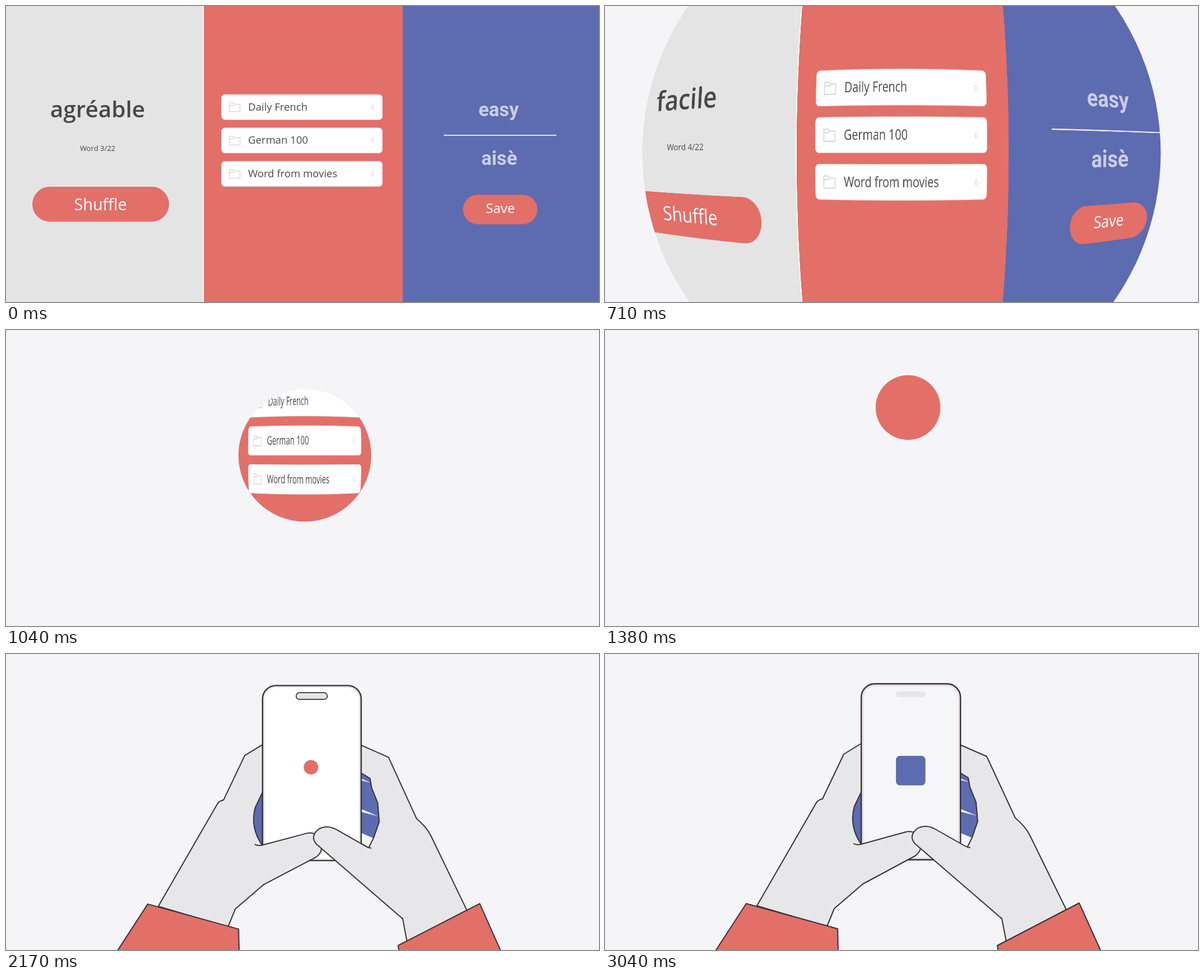
Write an HTML page with a canvas that moves like this. It is 1058 by 529 pixels and loops after 3080 ms.

```html
<!DOCTYPE html>
<html lang="en">
<head>
<meta charset="utf-8">
<title>Word cards</title>
<style>
  html, body { margin: 0; width: 100%; height: 100%; overflow: hidden; background: #f5f5f8; }
  canvas { display: block; width: 100vw; height: 100vh; }
</style>
</head>
<body>
<canvas id="stage" width="1058" height="529"></canvas>
<script>
const W = 1058, H = 529, LOOP = 3080;
const RED = '#e36f69', BLUE = '#5d6bb0', PAPER = '#f5f5f8', SKIN = '#e7e7e9', INK = '#343236';
const SANS = '"Open Sans", "Noto Sans", sans-serif';
const g = document.getElementById('stage').getContext('2d');

const clamp = (v, a = 0, b = 1) => Math.min(b, Math.max(a, v));
const ramp = (t, a, b) => { const p = clamp((t - a) / (b - a)); return p * p * (3 - 2 * p); };

// The ball shrinks out of the pages, drops into the phone and fills its screen.
const ballAt = t => ({
  x: 529 + 12.5 * ramp(t, 750, 1500) + 3.5 * ramp(t, 1900, 2300),
  y: 262.5 - 127 * ramp(t, 811, 1440) + 12 * ramp(t, 1440, 1830) + 60.5 * ramp(t, 1830, 2250),
  r: 54 + 606 / (1 + Math.exp((t - 795) / 115.6)) - 41 * ramp(t, 1380, 2000) + 208 * ramp(t, 2200, 2800)
});

function ball(t) {
  const { x, y, r } = ballAt(t);
  g.beginPath();
  g.arc(x, y, r, 0, Math.PI * 2);
  g.fillStyle = RED;
  g.fill();
}

function box(c, x, y, w, h, r, fill, line, width = 1) {
  c.beginPath();
  c.roundRect(x, y, w, h, r);
  c.fillStyle = fill;
  c.fill();
  if (line) {
    c.strokeStyle = line;
    c.lineWidth = width;
    c.stroke();
  }
}

function label(c, text, x, y, font, color, align = 'center') {
  c.font = font;
  c.fillStyle = color;
  c.textAlign = align;
  c.fillText(text, x, y);
}

const FOLDER = new Path2D('M0 0H7L9 2.5H19V15.5H0ZM0 4.5H9.5');

function card(c, y, name) {
  box(c, 384.5, y, 287, 45, 6, '#fff', '#e9d9d9', 0.8);
  c.save();
  c.translate(398.5, y + 15);
  c.strokeStyle = '#d3d3d5';
  c.lineWidth = 1.3;
  c.stroke(FOLDER);
  c.restore();
  label(c, name, 432, y + 28.5, '500 18.5px ' + SANS, '#48484a', 'left');
  label(c, '0', 653.5, y + 26.5, '10px ' + SANS, '#cfcfd1');
}

function pages(c, t) {
  const next = t >= 200;
  const columns = [[0, '#e4e4e4'], [351.5, '#fff'], [353, RED], [708, BLUE]];
  for (const [x, color] of columns) {
    c.fillStyle = color;
    c.fillRect(x, 0, W - x, H);
  }

  label(c, next ? 'facile' : 'agréable', 163.5, 199, '600 40.5px ' + SANS, '#48484a');
  label(c, `Word ${next ? 4 : 3}/22`, 163.5, 259, '500 13px ' + SANS, '#48484a');
  const press = 1 - 0.05 * ramp(t, 30, 180) * (1 - ramp(t, 220, 400));
  c.save();
  c.translate(169, 354);
  c.scale(press, press);
  box(c, -122, -31, 244, 62.5, 31.2, RED);
  label(c, 'Shuffle', -0.5, 10.5, '28.8px ' + SANS, '#fff');
  c.restore();

  ['Daily French', 'German 100', 'Word from movies'].forEach((name, i) => card(c, 158.2 + 59.6 * i, name));

  const bold = 'bold 34.5px Roboto, sans-serif';
  label(c, 'easy', 879, 197, bold, '#c9cde6');
  label(c, 'aisè', 880, 283.5, bold, '#c9cde6');
  c.fillStyle = '#eceef7';
  c.fillRect(781, 230.2, 201, 1.8);
  box(c, 815.5, 337.5, 132.5, 52.5, 26.2, RED, '#c9686f', 0.8);
  label(c, 'Save', 882, 370, '24px ' + SANS, '#fff');
}

function surface(w, h) {
  const c = document.createElement('canvas');
  c.width = w;
  c.height = h;
  return c.getContext('2d', { willReadFrequently: true });
}

const lens = surface(W, H);
const lensImage = lens.createImageData(W, H);
let pageData;

function pagePixels() {
  if (!pageData) {
    const c = surface(W * 2, H * 2);
    c.scale(2, 2);
    pages(c, 600);
    pageData = c.getImageData(0, 0, W * 2, H * 2).data;
  }
  return pageData;
}

// Bulging lens: each point of the ball looks up a point of the pages.
function warp(t, { x: cx, y: cy, r }) {
  const src = pagePixels(), out = lensImage.data, sw = W * 2, sh = H * 2;
  const open = ramp(t, 480, 710), shut = clamp((t - 710) / 330, 0, 1.2);
  const zx = 1 + 0.07 * open - 0.363 * shut;
  const zy = 1 + 0.43 * open - 0.255 * shut;
  const bend = open * (1 - 0.8 * shut);
  const x0 = Math.max(0, Math.floor(cx - r - 1)), x1 = Math.min(W, Math.ceil(cx + r + 1));
  const y0 = Math.max(0, Math.floor(cy - r - 1)), y1 = Math.min(H, Math.ceil(cy + r + 1));
  for (let y = y0; y < y1; y++) {
    const dy = y + 0.5 - cy, vv = dy * dy / (r * r);
    for (let x = x0; x < x1; x++) {
      const dx = x + 0.5 - cx, uu = dx * dx / (r * r);
      const sx = zx - bend * (0.18 * vv + 0.016 * uu);
      const sy = zy - bend * 0.3 * uu;
      const px = clamp((528.5 + dx / sx) * 2 - 0.5, 0, sw - 1.01);
      const py = clamp((263 + dy / sy) * 2 - 0.5, 0, sh - 1.01);
      const ix = px | 0, iy = py | 0, fx = px - ix, fy = py - iy;
      const a = (iy * sw + ix) * 4, b = a + sw * 4, o = (y * W + x) * 4;
      for (let n = 0; n < 3; n++) {
        const top = src[a + n] + (src[a + n + 4] - src[a + n]) * fx;
        const low = src[b + n] + (src[b + n + 4] - src[b + n]) * fx;
        out[o + n] = top + (low - top) * fy;
      }
      out[o + 3] = 255;
    }
  }
  lens.putImageData(lensImage, 0, 0, x0, y0, x1 - x0, y1 - y0);
}

function bubble(t) {
  const b = ballAt(t);
  warp(t, b);
  g.save();
  g.beginPath();
  g.arc(b.x, b.y, b.r, 0, Math.PI * 2);
  g.clip();
  g.drawImage(lens.canvas, 0, 0);
  g.globalAlpha = ramp(t, 1060, 1200);
  g.fillStyle = RED;
  g.fillRect(0, 0, W, H);
  g.restore();
}

function turn(x, y, degrees) {
  g.translate(x, y);
  g.rotate(degrees * Math.PI / 180);
  g.translate(-x, -y);
}

// Hands in the raised pose; k = 1 is the low pose, 0 the raised one.
const LEFT = {
  palm: new Path2D('M480 146L426 179L388 259Q381 260 377 266L271 450L396 487L409 455L460 411L500 350'),
  gap: new Path2D('M470 220L457 247L445 272Q435 308 457 340H480'),
  thumb: new Path2D('M444 339Q449 342 457 340L535 318.5Q554 313 560 331Q569 350 553 361L460 411'),
  sleeve: new Path2D('M139 620L252 446L415 491L418 620'),
  pose: k => g.translate(-16.8 * k, 0),
  flex: k => turn(450.6, 397.6, 13 * k)
};
const RIGHT = {
  palm: new Path2D('M610 152L681 183L732 293Q750 308 758 324L823 457L716 514L708 473L650 410L610 340'),
  gap: new Path2D('M600 192L648 221L651 238L662 265L665 299L655 328L646 346L600 318'),
  thumb: new Path2D('M651 346Q647 346 642 343L591 314Q573 303 557 312Q541 325 553 339L708 473'),
  sleeve: new Path2D('M716 620L700 521L846 445L925 620'),
  pose: k => turn(811, 597, 7.3 * k),
  flex: k => turn(708, 473, -6 * k)
};

function shape(path, fill, line = true) {
  g.fillStyle = fill;
  g.fill(path);
  g.strokeStyle = INK;
  g.lineWidth = 2;
  if (line) g.stroke(path);
}

// Light wedges between the fingers, each opening to the left of its tip.
function fingers() {
  g.save();
  g.clip(RIGHT.gap);
  g.fillStyle = PAPER;
  for (const [x, y, gape] of [[650, 229, 15], [663, 289, 14], [656, 329, 90]]) {
    g.beginPath();
    g.moveTo(x, y);
    g.lineTo(x - 80, y - 34);
    g.lineTo(x - 80, y - 34 + gape);
    if (gape > 50) g.lineTo(x, y + gape);
    g.fill();
  }
  g.restore();
}

function behind(hand, k) {
  g.save();
  hand.pose(k);
  shape(hand.palm, SKIN);
  shape(hand.gap, BLUE, false);
  if (hand === RIGHT) fingers();
  g.stroke(hand.gap);
  g.restore();
}

function inFront(hand, k) {
  g.save();
  hand.pose(k);
  g.save();
  hand.flex(k);
  shape(hand.thumb, SKIN);
  g.restore();
  shape(hand.sleeve, RED);
  g.restore();
}

function phone(t, inside) {
  const splash = ramp(t, 2700, 2900), pop = ramp(t, 2330, 2450);
  box(g, 457.2, 53.3, 177, 314.5, 24, splash > 0.5 ? '#ebe3e5' : '#e6e6e8', INK, 2.4);
  box(g, 461.2, 57.3, 169, 306.5, 20, '#fff');
  if (inside) {
    g.save();
    g.clip();
    g.resetTransform();
    ball(t);
    g.restore();
  }
  box(g, 517.5, 66.2, 56, 12, 6, '#e6e6e8', INK, 1.7);
  g.globalAlpha = splash;
  box(g, 461.2, 57.3, 169, 306.5, 20, '#f6f6f8');
  box(g, 519, 67, 53.5, 10, 5, '#e6e6e8');
  g.globalAlpha = 1;
  const half = 26.3 * pop;
  if (pop) box(g, 545.4 - half, 208.4 - half, half * 2, half * 2, 7 * pop, BLUE);
}

function scene(t) {
  const drop = 71 * Math.pow(Math.max(0, 2374 - t) / 544, 3.2);
  const k = Math.min(drop / 71, 1 + (drop - 71) * 0.003);
  const scale = 1 - 0.13 * Math.max(0, k), inside = t > 1900;
  g.lineJoin = g.lineCap = 'round';
  g.save();
  g.translate(545.5, 603 + drop - 71 * k);
  g.scale(scale, scale);
  g.translate(-545.5, -603);
  behind(LEFT, k);
  behind(RIGHT, k);
  phone(t, inside);
  inFront(LEFT, k);
  inFront(RIGHT, k);
  g.restore();
  if (!inside) ball(t);
}

function draw(t) {
  g.fillStyle = PAPER;
  g.fillRect(0, 0, W, H);
  if (t < 480) pages(g, t);
  else if (t < 1200) bubble(t);
  else if (t < 1385) ball(t);
  else scene(t);
}

const start = performance.now();
function tick() {
  draw((performance.now() - start) % LOOP);
  requestAnimationFrame(tick);
}
tick();
</script>
</body>
</html>
```
